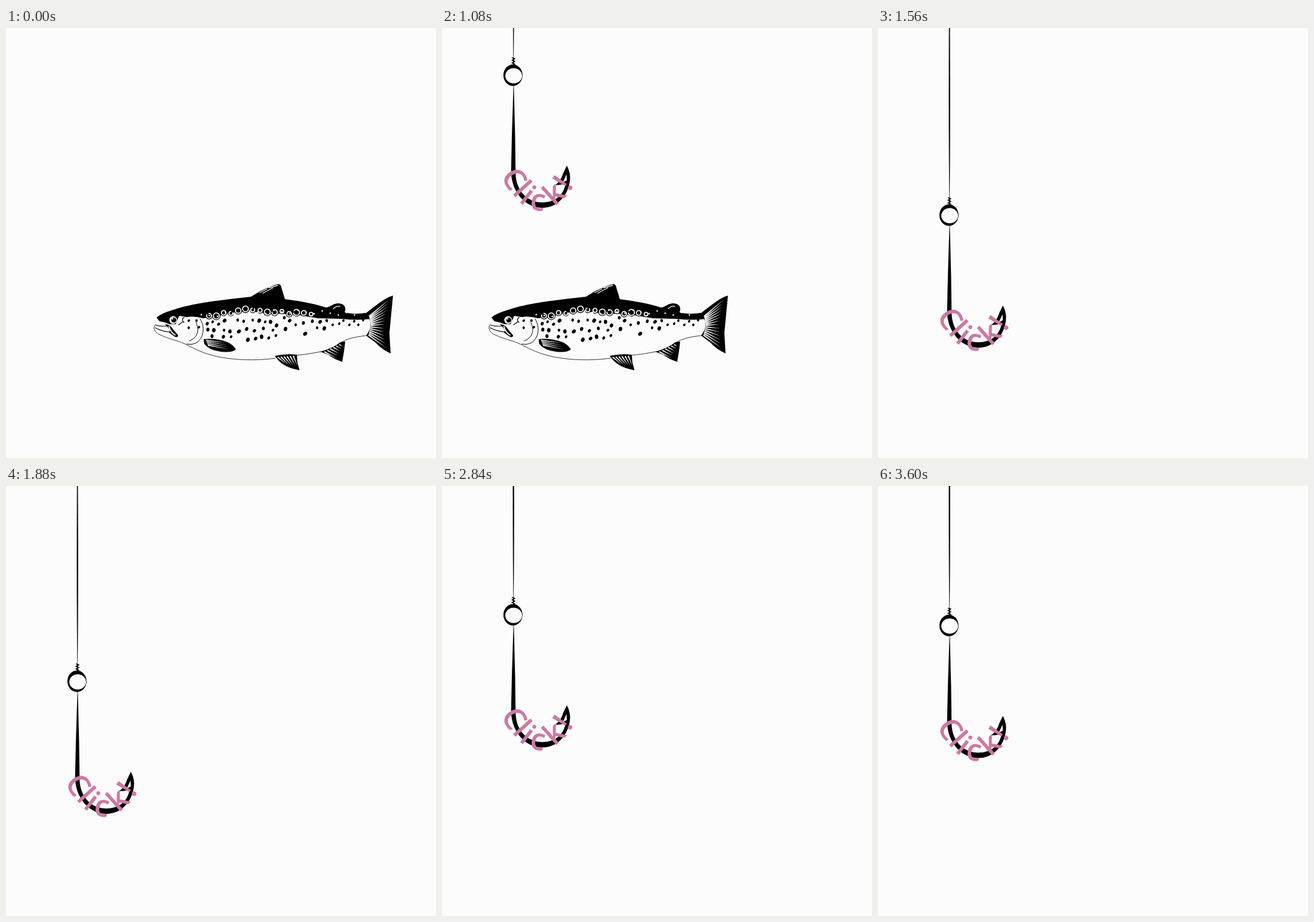
An HTML page for the animation above (3640 ms loop, 720x720 px).

```html
<!DOCTYPE html>
<html lang="en">
<head>
<meta charset="utf-8">
<title>Fish and hook</title>
<style>
  html, body { margin: 0; width: 100%; height: 100%; overflow: hidden; background: #fcfcfc; }
  svg { display: block; width: 100vw; height: 100vh; }
  .paper { fill: #fcfcfc; }
  .line { fill: none; stroke: #000; stroke-linecap: round; stroke-linejoin: round; }
  .cut { fill: none; stroke: #fcfcfc; stroke-linecap: round; }
  #word { fill: #cb79a4; font: 600 51px "Open Sans", "Noto Sans", sans-serif; font-stretch: 75%; text-anchor: middle; }
</style>
</head>
<body>
<svg viewBox="0 0 720 720">
  <g id="fish">
    <!-- belly and head outline -->
    <path class="line" stroke-width=".8" d="M249 498C246 503 249 509 256 513C270 520 288 523 302 530C322 541 341 549 370 553C400 557 428 556 451 553M487 548Q508 546 527 542M562 526Q574 518 603 515"/>
    <!-- back -->
    <path d="M252 485C258 479 270 475 283 471C310 462 345 457 410 450L425 441C436 436 446 431 457 428.500L460 431L467 454C490 457 514 461 536 468C544 467 547 461 557 461C567 462 570 468 567 476C580 480 594 478 602 477L610 487Q590 490 562 487L522 486Q500 482 478 479L440 478L405 474Q377 475 353 483L330 486Q315 482 303 484L290 482L284 496L274 496L266 493L257 491Z"/>
    <path class="cut" stroke-width="1.300" d="M425 443L437 437M430 444L447 435M440 435L455 431M548 470Q553 465 559 466"/>
    <!-- eye, jaw and gill -->
    <circle cx="280" cy="489" r="6.500" class="paper"/>
    <circle cx="281" cy="489" r="4.300"/>
    <circle cx="279" cy="487" r="1.300" class="paper"/>
    <path class="line" stroke-width="1.200" d="M250 497Q257 500 269 499M250 502Q261 508 274 509M289 497L296 492M300 484Q292 487 298 493"/>
    <path d="M266 496Q275 496 280 505L288 514Q289 519 283 517L273 510Q276 506 271 501Z"/>
    <path class="cut" stroke-width="2" d="M273 500Q275 509 283 514"/>
    <path class="line" stroke-width="1" d="M325 487C334 501 331 519 319 527Q311 531 303 529M318 493C325 507 320 519 307 524"/>
    <!-- paired fins -->
    <path d="M331 521Q351 519 371 526Q380 530 385 538Q379 544 360 542Q341 540 332 529Z"/>
    <path d="M450 549Q468 545 487 547L488 560L491.500 573Q474 570 464 563Q456 558 450 549Z"/>
    <path d="M526 542Q548 536 560 526L568 525L566 541L563 559Q548 554 540 547Z"/>
    <!-- tail -->
    <path d="M602 478Q616 467 627 459Q638 451 648 448L645 479L642 511L644 545Q629 538 619 527L603 515Q616 497 607 486Z"/>
    <g id="marks"></g>
  </g>
  <g id="hook">
    <path d="M119.300 -330Q117.700 -90 119.400 50H120Q121.600 -90 119.900 -330Z"/>
    <path class="line" stroke-width="1.500" d="M117.500 50L122 51.500L117 54L122 56L117 58.500L122 60.500M119.600 50V62"/>
    <path fill-rule="evenodd" d="M102.800 79a16 18 0 1 0 32 0a16 18 0 1 0 -32 0ZM106 80a14 12.800 0 1 0 28 0a14 12.800 0 1 0 -28 0Z"/>
    <path d="M119.600 97L117 180L115.700 240C116 275 140 301 168 301C196 301 214 276 214.500 250Q214 239 209 230.500L203 243Q200 254 190 263Q201 263 207 260C204 280 189 292 168 292C145 292 124 275 123.200 243L122.400 180L120.300 97Z"/>
    <path class="paper" d="M208.500 245L202 259L209 255Z"/>
    <g id="word"></g>
  </g>
</svg>
<script>
  const LOOP = 3640, STEP = 40;
  const get = id => document.getElementById(id);

  function add(parent, tag, attrs, text) {
    const el = document.createElementNS("http://www.w3.org/2000/svg", tag);
    for (const key in attrs) el.setAttribute(key, attrs[key]);
    if (text) el.textContent = text;
    parent.append(el);
  }

  // Paper-coloured wedges from one edge, tapering towards another
  const mix = (a, b, k) => a + (b - a) * k;
  function rays(n, base, end, width) {
    for (let i = 0; i < n; i++) {
      const k = i / (n - 1);
      const at = e => [mix(e[0], e[2], k), mix(e[1], e[3], k)];
      const [x, y] = at(base), [u, v] = at(end);
      const len = Math.hypot(u - x, v - y);
      const dx = (y - v) / len * width / 2, dy = (u - x) / len * width / 2;
      add(marks, "path", {
        class: "paper",
        d: `M${x + dx} ${y + dy}L${u} ${v}L${x - dx} ${y - dy}Z`
      });
    }
  }

  const marks = get("marks");
  rays(7, [608, 483, 611, 496], [642, 454, 635, 490], 2.4);
  rays(7, [611, 498, 607, 514], [634, 496, 637, 536], 2.4);
  rays(6, [455, 551, 481, 549], [471, 564, 488, 566], 2.2);
  rays(6, [533, 542, 558, 530], [554, 553, 563, 533], 2.2);
  rays(4, [335, 523, 338, 531], [369, 527, 373, 538], 1.8);

  const spots = [
    337,495, 346,492, 338,505, 348,506, 356,496, 365,506, 375,508, 366,490, 388,489,
    398,491, 390,508, 403,504, 413,489, 416,507, 424,490, 431,503, 434,492, 418,520,
    428,517, 440,519, 447,506, 443,492, 453,498, 452,515, 466,485, 468,504, 475,490,
    485,497, 498,494, 501,512, 513,491, 521,502, 526,492, 533,503, 537,490, 547,497,
    558,495, 565,490, 575,497, 583,491, 590,497, 364,517, 377,517, 345,516, 405,522,
    306,490, 319,490, 306,502, 323,501, 598,489
  ];
  for (let i = 0; i < spots.length; i += 2) {
    const x = spots[i], y = spots[i + 1];
    const r = x < 330 || x > 540 ? 1.9 : 2.5 + Math.sin(i * 2.3) * .5;
    add(marks, "ellipse", {
      rx: r, ry: r * 1.25,
      transform: `translate(${x} ${y}) rotate(${20 + 25 * Math.sin(i)})`
    });
  }

  // Pale rings along the lower edge of the back
  for (let i = 0; i < 15; i++) {
    const x = 340 + i * 12.2;
    const y = 476 + 6 * Math.cos((x - 335) / 27) * (x < 425 ? 1 : .25) + 2 * Math.sin(i * 2.4);
    const r = 4 + Math.sin(i * 1.7);
    add(marks, "circle", { cx: x, cy: y, r: r + 2 });
    add(marks, "circle", {
      class: "cut", cx: x, cy: y, r, "stroke-width": 1.8,
      "stroke-dasharray": i % 3 ? "30" : "14 4"
    });
  }
  for (let i = 0; i < 22; i++) {
    add(marks, "circle", {
      class: "paper", cx: 300 + i * 13.5, cy: 485 - 10 * Math.sin(i * Math.PI / 25) + 3 * Math.sin(i * 2.1), r: 1.3
    });
  }

  // Letter, baseline centre, angle
  [
    ["C", 106, 262, 57],
    ["l", 121, 281, 48],
    ["i", 133, 294, 38],
    ["c", 158, 305, 10],
    ["k", 199, 290, -42],
    ["!", 217, 269, -57]
  ].forEach(([letter, x, y, turn]) =>
    add(get("word"), "text", { transform: `translate(${x} ${y}) rotate(${turn})` }, letter));

  // Height of the hook's tip over time
  const path = [[0, -296.5], [1712, 539], [2120, 392], [2240, 353], [LOOP, 386]];
  function tipAt(t) {
    const i = path.findIndex(p => p[0] > t);
    const [t0, y0] = path[i - 1], [t1, y1] = path[i];
    return mix(y0, y1, (t - t0) / (t1 - t0));
  }

  // The fish backs up, then darts out to the left
  function fishAt(t) {
    const k = Math.min(Math.max((t - 816) / 324, 0), 1.5);
    return -510 * (2.70158 * k ** 3 - 1.70158 * k ** 2);
  }

  const start = performance.now();
  function draw() {
    const t = Math.floor((performance.now() - start) % LOOP / STEP) * STEP;
    get("fish").setAttribute("transform", `translate(${fishAt(t)} 0)`);
    get("hook").setAttribute("transform", `translate(0 ${tipAt(t) - 230.5})`);
    get("hook").setAttribute("visibility", t < 480 ? "hidden" : "visible");
    requestAnimationFrame(draw);
  }
  draw();
</script>
</body>
</html>
```
